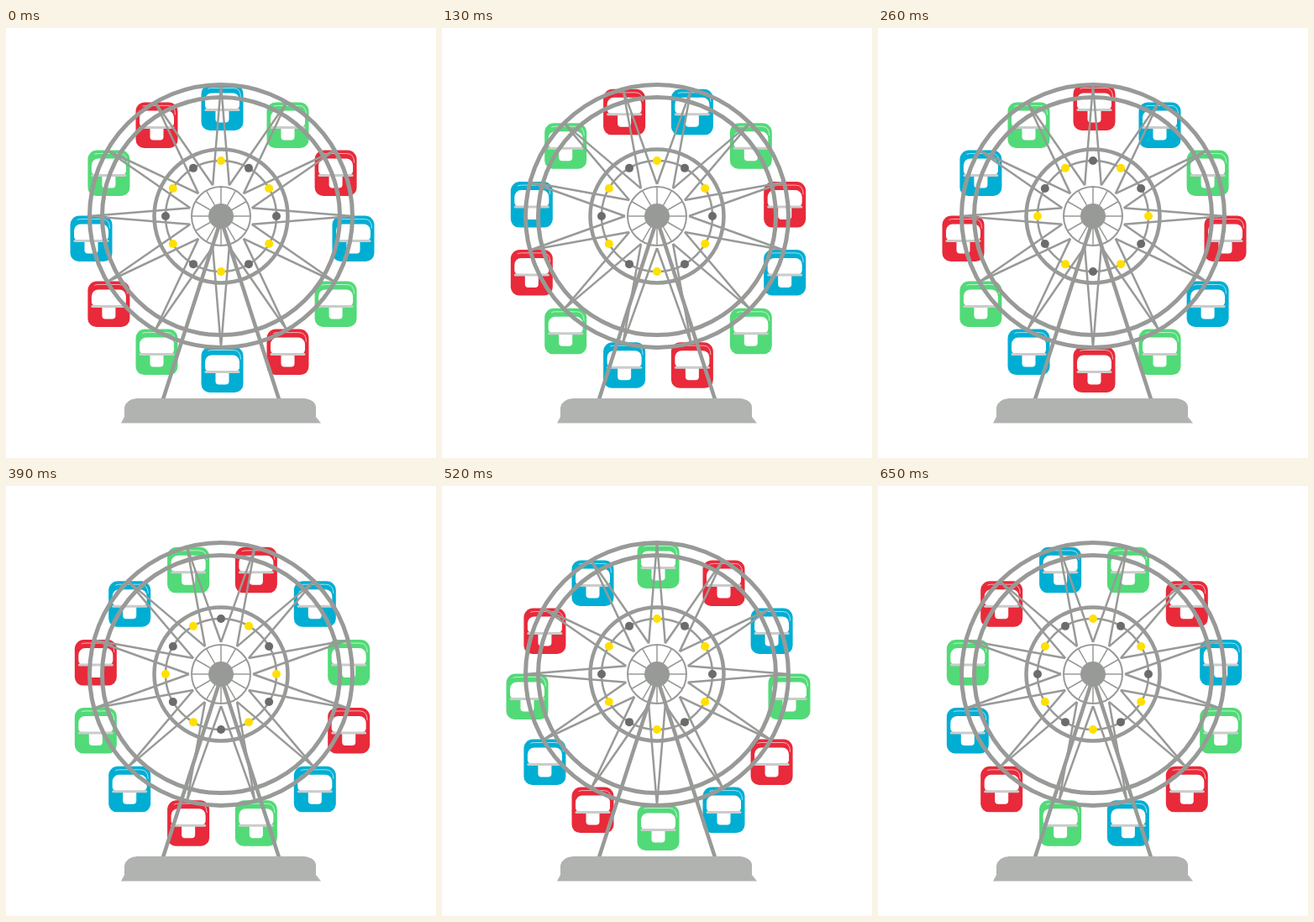
An HTML page with a canvas for the animation above (780 ms loop, 512 px wide and 512 px high).

```html
<!DOCTYPE html>
<html lang="en">
<head>
<meta charset="utf-8">
<title>Ferris wheel</title>
<style>
  html, body { margin: 0; width: 100%; height: 100%; overflow: hidden; background: #fff; }
  canvas { display: block; width: 100vmin; height: 100vmin; }
</style>
</head>
<body>
<canvas id="stage" width="512" height="512"></canvas>
<script>
const ctx = document.getElementById('stage').getContext('2d');
const STEP = 130, STEPS = 6, TAU = Math.PI * 2, SLICE = TAU / 12;
const CX = 256, CY = 224, RIM = 156.5;
const STEEL = '#989a97', BASE = '#b0b3b0', YELLOW = '#ffe000', DARK = '#6c6c6c';
const CABINS = ['#00aed3', '#52da78', '#e82a3a'];

const polar = (r, a, x = CX, y = CY) => [x + r * Math.sin(a), y - r * Math.cos(a)];

function line(width, color, ...points) {
  ctx.lineWidth = width;
  ctx.strokeStyle = color;
  ctx.beginPath();
  points.forEach(p => ctx.lineTo(...p));
  ctx.stroke();
}

function ring(r, width) {
  ctx.lineWidth = width;
  ctx.strokeStyle = STEEL;
  ctx.beginPath();
  ctx.arc(CX, CY, r, 0, TAU);
  ctx.stroke();
}

function disc(x, y, r, color) {
  ctx.fillStyle = color;
  ctx.beginPath();
  ctx.arc(x, y, r, 0, TAU);
  ctx.fill();
}

function box(x, y, w, h, radii, color) {
  ctx.fillStyle = color;
  ctx.beginPath();
  ctx.roundRect(x, y, w, h, radii);
  ctx.fill();
}

function cabin(x, y, color) {
  ctx.save();
  ctx.translate(x, y);
  box(-25, -27, 50, 54.5, [11, 11, 10, 10], color);
  // highlight along the roof edge
  ctx.lineWidth = 1;
  ctx.strokeStyle = '#ffffffa0';
  ctx.stroke(new Path2D('M-17 -22Q-15 -23 -12 -23H13Q22 -23 22 -12'));
  box(-20.5, -17, 41, 19.5, [8, 8, 5, 5], '#fff');
  box(-8, 3, 16, 15, [0, 0, 4, 4], '#fff');
  box(-21, 1.5, 42, 3, 1.5, '#c9cccb');
  ctx.restore();
}

function wheel(turn, swap) {
  for (let i = 0; i < 12; i++) {
    const a = i * SLICE + turn;
    line(2.5, STEEL, polar(38, a - SLICE / 2), polar(RIM, a), polar(38, a + SLICE / 2));
    line(1.5, STEEL, [CX, CY], polar(35, i * SLICE));
  }
  ring(RIM, 5);
  ring(141.5, 5);
  ring(79.5, 4.5);
  ring(66, 2.5);
  ring(35, 2);
  for (let i = 0; i < 12; i++)
    disc(...polar(66, i * SLICE), 5, (i + swap) % 2 ? DARK : YELLOW);
}

function stand() {
  line(4.5, STEEL, [187, 442], [CX, CY + 4], [325, 442]);
  disc(CX, CY, 15, STEEL);
  ctx.fillStyle = BASE;
  ctx.fill(new Path2D('M156 441H355Q369 443 369 452V463L375 470.5H137L141 463V452Q143 442 156 441Z'));
}

function draw(step) {
  ctx.fillStyle = '#fff';
  ctx.fillRect(0, 0, 512, 512);
  // Each step turns the wheel half a slice; every second one moves the colours on.
  const turn = step % 2 * SLICE / 2, shift = step >> 1;
  for (let i = 0; i < 12; i++)
    cabin(...polar(156, i * SLICE + turn, 257.5, 250.5), CABINS[(i - shift + 3) % 3]);
  wheel(turn, shift % 2);
  stand();
}

const start = performance.now();
function tick() {
  draw(Math.floor((performance.now() - start) / STEP) % STEPS);
  requestAnimationFrame(tick);
}
tick();
</script>
</body>
</html>
```
